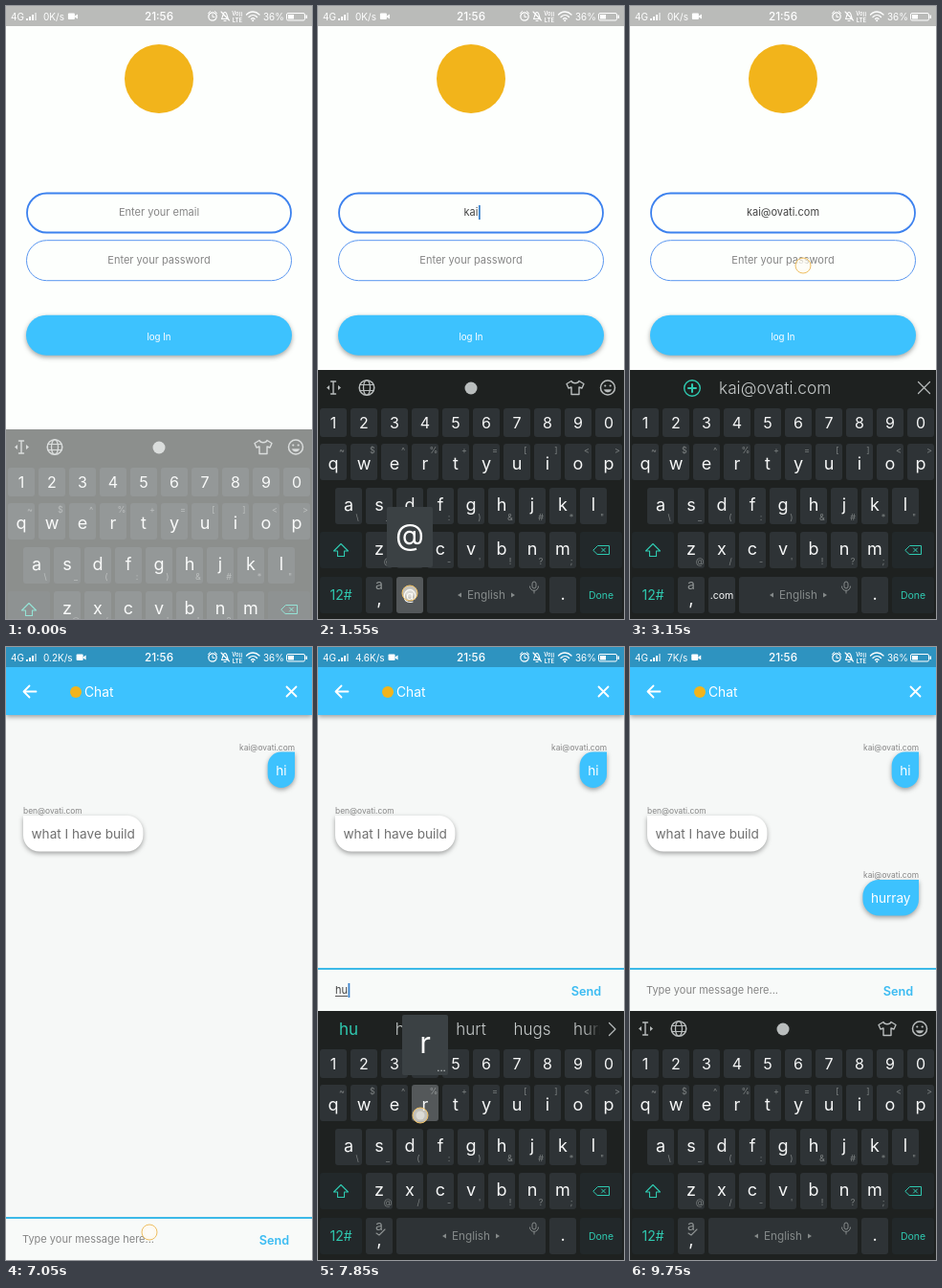
Recreate the animation shown at these times as an HTML page. Size 320 by 640 pixels, loop 9900 ms.

```html
<!DOCTYPE html>
<html lang="en">
<head>
<meta charset="utf-8">
<title>Chat login</title>
<style>
  html, body { margin: 0; width: 100%; height: 100%; overflow: hidden; background: #fdfffd; }
  svg { display: block; width: 320px; height: 640px; font-family: Inter, Roboto, sans-serif; }
  text { white-space: pre; }
  .lift { filter: drop-shadow(0 2px 2.5px rgba(0, 0, 0, .36)); }
</style>
</head>
<body>
<svg id="stage" viewBox="0 0 320 640"></svg>
<script>
const LOOP = 9900, STEP = 50, CHAT_AT = 7050;
const ME = 'kai@ovati.com', FRIEND = 'ben@ovati.com';
const BLUE = '#3dc2fe', TEAL = '#2fc9b0', GOLD = '#f2b41b', ICON = '#b9bdbd', PANEL = '#1e2120';
const HINT = '#868686';

// Key presses: character, down, up, finger offset from the key's centre
const LOGIN_TAPS = [
  ['k', 250, 400], ['a', 750, 900], ['i', 1300, 1400], ['@', 1500, 1600, 0, -2],
  ['o', 1650, 1750], ['v', 1800, 1900], ['a', 1950, 2050, -2, -6],
  ['t', 2250, 2350], ['i', 2600, 2650], ['.com', 2850, 2900]
];
const CHAT_TAPS = [
  ['h', 7500, 7600], ['u', 7650, 7750], ['r', 7800, 7900, -5, 13],
  ['r', 8050, 8150], ['a', 8400, 8500], ['y', 8600, 8700]
];
const SENT_AT = 9050, REPLY_AT = 9100;
const HINTS = {
  h: 'he how have had', hu: 'hug hurt hugs hurry', hur: 'hurt hurry hurts hurdle',
  hurr: 'hurry hurray hurrah hurried', hurra: 'hurray hurrah hurry hurrahs', hurray: 'hurrah hurry hurrays hooray'
};

const stage = document.getElementById('stage');
const pen = document.createElement('canvas').getContext('2d');
const esc = s => s.replace(/&/g, '&amp;').replace(/</g, '&lt;');

function widthOf(s, size) {
  pen.font = `${size}px Inter, Roboto, sans-serif`;
  return pen.measureText(s).width;
}
const text = (s, x, y, size, fill, anchor = 'middle', weight = 400) =>
  `<text x="${x}" y="${y}" font-size="${size}" fill="${fill}" text-anchor="${anchor}" font-weight="${weight}">${esc(s)}</text>`;
const rect = (x, y, w, h, r, fill, more = '') =>
  `<rect x="${x}" y="${y}" width="${w}" height="${h}" rx="${r}" fill="${fill}" ${more}/>`;
const line = (d, color, width = 1.5, fill = 'none') =>
  `<path d="${d}" stroke="${color}" stroke-width="${width}" fill="${fill}" stroke-linecap="round" stroke-linejoin="round"/>`;
const disc = (x, y, r, fill, more = '') => `<circle cx="${x}" cy="${y}" r="${r}" fill="${fill}" ${more}/>`;
const ring = (x, y, r, color, width = 1.5) => disc(x, y, r, 'none', `stroke="${color}" stroke-width="${width}"`);
const cross = (x, y, r, color, width) =>
  line(`M${x - r} ${y - r}l${2 * r} ${2 * r}m0 ${-2 * r}l${-2 * r} ${2 * r}`, color, width);
const finger = (x, y) =>
  disc(x, y, 8, 'rgba(255,250,238,.65)', 'stroke="#efbf62"') + disc(x, y, 4.5, 'rgba(255,255,255,.4)');

// Keyboard
const ROWS = [
  { keys: '1234567890', x: 16, y: 420, h: 30, base: 21, size: 16 },
  { keys: 'qwertyuiop', marks: '~$^%+=[]<>', x: 16, y: 457, h: 38, base: 26.5, size: 18, markY: 10 },
  { keys: 'asdfghjkl', marks: '\\_(:)&#*"', x: 32, y: 503, h: 38, base: 23.5, size: 18, markY: 34 },
  { keys: 'zxcvbnm', marks: "@/-'!?;", x: 64, y: 549, h: 38, base: 24, size: 18, markY: 34 }
];
const KEYS = { '@': { x: 96, y: 596, h: 38 }, '.com': { x: 96, y: 596, h: 38 } };
for (const row of ROWS)
  [...row.keys].forEach((c, i) => KEYS[c] = { x: row.x + 32 * i, y: row.y, h: row.h, marked: !!row.marks });

function keyboardBody(extra) {
  const cap = (x, y, w, h, fill = '#2e3336') => rect(x, y, w, h, 3, fill);
  let s = rect(0, 380, 320, 330, 0, PANEL);
  for (const row of ROWS) [...row.keys].forEach((c, i) => {
    const x = row.x + 32 * i;
    s += cap(x - 14, row.y, 28, row.h) + text(c, x, row.y + row.base, row.size, '#f6f7f7');
    if (row.marks) s += text(row.marks[i], x + 9, row.y + row.markY, 9, '#7d8282');
  });
  for (const [x, y] of [[2, 549], [274, 549], [2, 596], [274, 596]]) s += cap(x, y, 44, 38, '#22282a');
  s += line('M24 561.500l7.500 7.500h-4v5.500h-7v-5.500h-4z', TEAL, 1.1);
  s += line('M288 568l4.500-4.500h12v9h-12zM296.500 566l4 4m0-4l-4 4', TEAL, 1);
  s += text('12#', 24, 620, 14, TEAL) + text('Done', 296, 619, 10.5, TEAL);
  s += cap(50, 596, 28, 38) + text('a', 64, 609, 14, '#8f9494') + text(',', 64, 625, 19, '#f6f7f7');
  if (extra) s += cap(82, 596, 28, 38) + text(extra, 96, extra === '@' ? 620 : 619, extra === '@' ? 15 : 10.6, '#f6f7f7');
  else s += line('M61 612l3 2 6-6', '#8f9494', 1.1);
  const left = extra ? 114 : 82, mid = (left + 238) / 2;
  s += cap(left, 596, 238 - left, 38) + text('English', mid, 619, 11.7, '#858a8a');
  s += `<path d="M${mid - 26} 612.500v5l-4-2.500zM${mid + 26} 612.500v5l4-2.500z" fill="#858a8a"/>`;
  s += rect(224, 601, 4, 7, 2, 'none', 'stroke="#858a8a"') + line('M221.500 606c0 6 9 6 9 0M226 610.500v2.500', '#858a8a', 1);
  return s + cap(242, 596, 28, 38) + text('.', 256, 620, 18, '#f6f7f7');
}
const bodies = { '@': keyboardBody('@'), '.com': keyboardBody('.com'), '': keyboardBody('') };

const TOOLS =
  line('M13.500 392h5m-2.500 0v13m-2.500 0h5', ICON, 1.4) +
  `<path d="M9 398.500l3-2.500v5zM24 398.500l-3-2.500v5z" fill="${ICON}"/>` +
  ring(51, 398.5, 7.8, ICON) + `<ellipse cx="51" cy="398.500" rx="3.500" ry="7.800" fill="none" stroke="${ICON}" stroke-width="1.300"/>` +
  line('M44 395.500h14m-14 6h14', ICON, 1.2) +
  disc(160, 399, 6.5, ICON) +
  line('M265 391.500c1 3 7 3 8 0l5 3-2 4.500-3-1v7.500h-8v-7.500l-3 1-2-4.500z', ICON, 1.4) +
  ring(303, 398.5, 7.5, ICON) + disc(300.3, 396.5, 1.1, ICON) + disc(305.7, 396.5, 1.1, ICON) +
  line('M299.500 401c1.500 2.700 5.500 2.700 7 0z', ICON, .8, ICON);

function hintBar(word) {
  let s = text(word, 32, 405, 17, TEAL);
  HINTS[word].split(' ').forEach((w, i) => s += text(w, 96 + 64 * i, 405, 17, '#c6caca', 'middle', 350));
  return s + rect(278, 381, 18, 36, 0, 'url(#fade)') + rect(295, 381, 25, 36, 0, PANEL) +
    line('M304.500 392.500l6.500 6.500-6.500 6.500', ICON, 1.2);
}
const doneBar = ring(65, 399, 8.3, TEAL, 1.4) + line('M61 399h8m-4-4v8', TEAL, 2) +
  text(ME, 93, 405, 17.3, '#c6caca', 'start', 350) + cross(307.5, 398.5, 6, ICON, 1.2);

function keyboard(bar, extra, progress) {
  const left = (1 - progress) ** 2;
  return `<g transform="translate(0 ${62 * left})" opacity="${1 - .5 * left}">${bodies[extra]}${bar}</g>`;
}

function touches(taps, t) {
  let s = '';
  for (const [c, down, up, dx = -3, dy = 3] of taps) {
    const k = KEYS[c];
    if (t < down || t >= up + 100) continue;
    if (t < up) {
      s += rect(k.x - 14, k.y, 28, k.h, 3, 'rgba(255,255,255,.18)');
      if (c !== '.com') s += rect(k.x - 24, k.y - 73, 48, 63, 2, '#3b4144') + text(c, k.x, k.y - 33, 31, '#fff');
      if (k.marked) s += text('...', k.x + 17, k.y - 14, 11, '#d0d4d4');
    }
    s += finger(k.x + dx, k.y + k.h / 2 + dy);
  }
  return s;
}
const typed = (taps, t) => taps.filter(tap => tap[2] <= t).map(tap => tap[0]).join('');

function statusBar(bg, speed) {
  const cam = 43 + widthOf(speed, 10);
  let s = rect(0, 0, 320, 21, 0, bg) + text('4G', 5, 15, 10, '#fff', 'start');
  for (let i = 0; i < 4; i++) s += rect(21 + 3 * i, 13 - 2 * i, 2, 2 + 2 * i, 0, i < 3 ? '#fff' : 'rgba(255,255,255,.5)');
  s += text(speed, 39, 14.5, 10, '#fff', 'start') + rect(cam, 7.5, 7, 6.5, 1, '#fff') +
    `<path d="M${cam + 7} 10.500l3-2v5l-3-2z" fill="#fff"/>`;
  s += text('21:56', 160, 15, 11.7, '#fff', 'middle', 450);
  s += ring(216, 11, 4.2, '#fff', 1.2) + line('M216 9v2.500h2M211.500 7.500l2-2m7 2l-2-2', '#fff', 1);
  s += line('M225.500 13.500c1.500-2 1-7 3.500-7s2 5 3.500 7zM228 15.500h2M225 6l8.500 9', '#fff', 1.1);
  s += text('Vo))', 242, 10, 5.6, '#fff', 'middle', 600) + text('LTE', 242, 16.500, 6, '#fff', 'middle', 600);
  s += line('M251.500 9c4-4 9.500-4 13.500 0M254 11.500c2.500-2.500 6-2.500 8.500 0M256.500 13.500c1-1 2.500-1 3.500 0', '#fff', 1.3) + disc(258.2, 15.3, 1, '#fff');
  s += text('36%', 269, 14.5, 9.8, '#fff', 'start');
  return s + rect(293.5, 7.5, 19, 7.5, 1.5, 'none', 'stroke="#fff"') + rect(295, 9, 6, 4.5, 0, '#fff') + rect(313.5, 9.5, 1.5, 3.5, 0, '#fff');
}

function login(t) {
  const mail = typed(LOGIN_TAPS, t), end = 160 + widthOf(mail, 11) / 2;
  let s = rect(0, 0, 320, 640, 0, '#fdfffd') + statusBar('#babbb9', '0K/s') + disc(160, 76, 36, GOLD);
  s += rect(22, 195.5, 276, 41, 20.5, '#fdfffd', 'stroke="#3d82ee" stroke-width="1.800"');
  s += rect(21.5, 244.7, 277, 42, 21, '#fdfffd', 'stroke="#5a97f0"');
  s += mail ? text(mail, 160, 219, 11, '#444') : text('Enter your email', 160, 219, 11, HINT);
  if (t >= 250 && t < 3150) s += rect(end + .5, 208, 1.8, 15, 0, '#3a82cc');
  s += text('Enter your password', 160, 269, 11, HINT);
  s += rect(21, 322.7, 278, 42, 21, BLUE, 'class="lift"') + text('log In', 160, 348.5, 9.7, '#fff');
  s += keyboard(t < 2950 ? TOOLS : doneBar, mail.includes('@') ? '.com' : '@', Math.min(1, t / 100));
  return s + touches(LOGIN_TAPS, t) + (t >= 3150 ? finger(181, 271) : '');
}

function bubble(msg, y, mine) {
  const w = widthOf(msg, 13.6) + 17, x = mine ? 302 - w : 18, r = Math.min(17, w / 2);
  const top = mine
    ? `M${x} ${y + r}a${r} ${r} 0 0 1 ${r} ${-r}H${x + w}V${y + 37.5 - r}`
    : `M${x} ${y}H${x + w - r}a${r} ${r} 0 0 1 ${r} ${r}V${y + 37.5 - r}`;
  const d = `${top}a${r} ${r} 0 0 1 ${-r} ${r}H${x + r}a${r} ${r} 0 0 1 ${-r} ${-r}z`;
  return text(mine ? ME : FRIEND, mine ? 302 : 18, y - 2, 8.4, '#858585', mine ? 'end' : 'start') +
    `<path class="lift" d="${d}" fill="${mine ? BLUE : '#fff'}"/>` +
    text(msg, x + 8.5, y + 24, 13.6, mine ? '#fff' : '#707070', 'start');
}

function chat(t) {
  const open = t >= 7200, y = open ? 336 : 596;
  const msg = t < SENT_AT ? typed(CHAT_TAPS, t) : '';
  const speed = t < 7400 ? '0.2K/s' : t < 8900 ? '4.6K/s' : '7K/s';
  let s = rect(0, 0, 320, 640, 0, '#f6f8f7') + rect(0, 21, 320, 50, 0, BLUE, 'class="lift"') + statusBar('#2e93c0', speed);
  s += line('M31.500 46.500h-12.500m5.500-6l-6 6 6 6', '#fff', 1.8) + cross(298.5, 46.5, 5, '#fff', 1.8);
  s += disc(73, 47, 6, GOLD) + text('Chat', 82, 52, 13.8, '#fff', 'start');
  s += bubble('hi', 109.5, true) + bubble('what I have build', 176, false);
  if (t >= REPLY_AT) s += bubble('hurray', 243, true);
  s += rect(0, y, 320, 640 - y, 0, '#f8faf9') + rect(0, y - 1, 320, 2, 0, '#3cb9e8');
  if (msg) {
    const w = widthOf(msg, 11);
    s += text(msg, 18, y + 26, 11, '#444', 'start') + rect(18, y + 28, w, 1, 0, '#555') + rect(18.5 + w, y + 15, 1.8, 15, 0, '#3a82cc');
  } else s += text('Type your message here...', 17, y + 26, 11, HINT, 'start');
  s += text('Send', 280.5, y + 27.5, 12.7, '#3bbbf2', 'middle', 600);
  if (open) s += keyboard(msg ? hintBar(msg) : TOOLS, '', Math.min(1, (t - 7200) / 200));
  s += touches(CHAT_TAPS, t);
  if (t < 7150) s += finger(150, 611);
  if (t >= 8900 && t < 9100) s += finger(281, 360);
  return s;
}

const DEFS = `<defs><linearGradient id="fade"><stop stop-color="${PANEL}" stop-opacity="0"/><stop offset="1" stop-color="${PANEL}"/></linearGradient></defs>`;
const start = performance.now();
let shown = -1;

function draw() {
  const t = Math.floor(((performance.now() - start) % LOOP) / STEP) * STEP;
  if (t !== shown) {
    shown = t;
    stage.innerHTML = DEFS + (t < CHAT_AT ? login(t) : chat(t));
  }
  requestAnimationFrame(draw);
}
draw();
</script>
</body>
</html>
```
